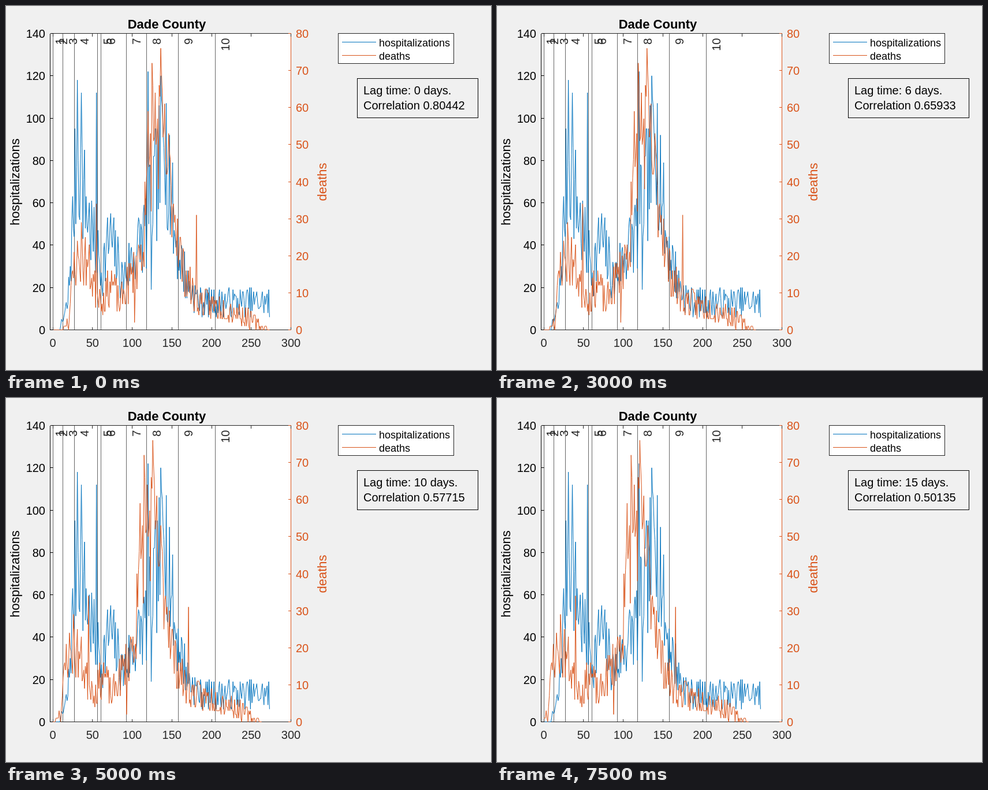
Write an HTML page that moves like this. It is 840 px wide and 630 px high and loops after 8 s.

```html
<!DOCTYPE html>
<html lang="en">
<head>
<meta charset="utf-8">
<title>Lag correlation</title>
<style>
  html, body { margin: 0; width: 100%; height: 100%; overflow: hidden; background: #f0f0f0; }
  svg { display: block; width: 840px; height: 630px; }
  text { font-family: "Liberation Sans", Arial, sans-serif; font-size: 20px; fill: #000; }
  .label { font-size: 22px; }
  .legend { font-size: 18px; }
  .crisp { shape-rendering: crispEdges; fill: none; }
  .series { fill: none; stroke-width: 1; stroke-linejoin: round; }
</style>
</head>
<body>
<svg id="stage" viewBox="0 0 840 630" xmlns="http://www.w3.org/2000/svg"></svg>
<script>
const stage = document.getElementById('stage');
const DARK = '#262626', BLUE = '#0072bd', ORANGE = '#d95319';
const DAY = 1.375, LEFT = 76.5, RIGHT = 493.5, TOP = 47.5, BOTTOM = 560.5;
const STEP = 500, LAGS = 16, LAST_DAY = 273, TICK = 5;

const dayX = day => 81 + day * DAY;
const valueY = (value, max) => BOTTOM - value / max * (BOTTOM - TOP);
const snap = x => Math.floor(x) + 0.5;

function add(parent, tag, attrs, content) {
  const el = document.createElementNS('http://www.w3.org/2000/svg', tag);
  for (const key in attrs) el.setAttribute(key, attrs[key]);
  if (content !== undefined) el.textContent = content;
  parent.append(el);
  return el;
}
const line = (x1, y1, x2, y2, stroke = DARK, opacity = 1) =>
  add(stage, 'line', { x1, y1, x2, y2, stroke, 'stroke-opacity': opacity, class: 'crisp' });
const box = (x, y, width, height, fill, stroke) =>
  add(stage, 'rect', { x, y, width, height, fill, stroke, 'shape-rendering': 'crispEdges' });
const text = (x, y, content, attrs = {}) => add(stage, 'text', { x, y, ...attrs }, content);
const upright = (x, y, content, attrs) =>
  text(0, 0, content, { transform: `translate(${x} ${y}) rotate(-90)`, ...attrs });

function seeded(seed) {
  return () => {
    seed = (seed * 1664525 + 1013904223) >>> 0;
    return seed / 4294967296;
  };
}

// Linear interpolation through [x, y] points, held flat at both ends.
function interpolate(points, x) {
  const next = points.findIndex(p => p[0] > x);
  if (next === 0) return points[0][1];
  if (next < 0) return points[points.length - 1][1];
  const [x0, y0] = points[next - 1], [x1, y1] = points[next];
  return y0 + (y1 - y0) * (x - x0) / (x1 - x0);
}

// Each series is a trend with daily noise around it and a few fixed spikes.
const hospitalizations = {
  max: 140, noise: 0.4, seed: 7,
  trend: [[9, 0], [19, 12], [31, 86], [40, 62], [52, 40], [62, 28], [72, 44], [88, 23],
    [100, 34], [118, 48], [138, 82], [146, 80], [153, 45], [170, 21], [185, 13], [273, 13]],
  spikes: { 31: 118, 36: 112, 55: 112, 120: 122, 124: 19, 136: 120, 143: 107, 273: 6 }
};
const deaths = {
  max: 80, noise: 0.3, seed: 23,
  trend: [[12, 0], [20, 3], [28, 19], [44, 18], [54, 11], [64, 8], [74, 13], [84, 7],
    [102, 16], [114, 23], [126, 53], [136, 54], [154, 32], [163, 17], [180, 8], [230, 5], [273, 0]],
  spikes: { 36: 29, 55: 34, 103: 2, 116: 40, 120: 59, 125: 72, 136: 76, 181: 31 }
};

function seriesPoints({ max, noise, seed, trend, spikes }) {
  const random = seeded(seed), points = [];
  for (let day = 1; day <= LAST_DAY; day++) {
    const mean = interpolate(trend, day);
    const spread = Math.min(mean, noise * mean + 2);
    const value = spikes[day] ?? Math.round(mean + spread * (random() * 2 - 1));
    points.push(`${dayX(day).toFixed(2)},${valueY(value, max).toFixed(2)}`);
  }
  return points.join(' ');
}

// Axes
box(LEFT, TOP, RIGHT - LEFT, BOTTOM - TOP, '#fff', 'none');
line(LEFT, TOP, RIGHT, TOP);
line(LEFT, BOTTOM, RIGHT, BOTTOM);
line(LEFT, TOP, LEFT, BOTTOM, '#000');
line(RIGHT, TOP, RIGHT, BOTTOM, ORANGE);
for (let day = 0; day <= 300; day += 50) {
  const x = snap(dayX(day));
  line(x, BOTTOM, x, BOTTOM - TICK);
  line(x, TOP, x, TOP + TICK);
  text(dayX(day), 590, day, { 'text-anchor': 'middle', style: `fill:${DARK}` });
}
for (let value = 0; value <= 140; value += 20) {
  const y = valueY(value, 140);
  line(LEFT, snap(y), LEFT + TICK, snap(y), '#000');
  text(68, y + 7.5, value, { 'text-anchor': 'end' });
}
for (let value = 0; value <= 80; value += 10) {
  const y = valueY(value, 80);
  line(RIGHT - TICK, snap(y), RIGHT, snap(y), ORANGE);
  text(502, y + 7.5, value, { style: `fill:${ORANGE}` });
}
text(278.5, 39, 'Dade County', { class: 'label', 'text-anchor': 'middle', 'font-weight': 'bold' });
upright(23, 304.5, 'hospitalizations', { class: 'label', 'text-anchor': 'middle' });
upright(555, 304.5, 'deaths', { class: 'label', 'text-anchor': 'middle', style: `fill:${ORANGE}` });

// Numbered event days; the first lies outside the plot
[-4, 0, 13, 27, 56, 61, 93, 118, 158, 205].forEach((day, i) => {
  const x = snap(dayX(day));
  if (x > LEFT) line(x, TOP, x, BOTTOM, DARK, 0.7);
  upright(x + 24.5, 55.5, i + 1, { 'text-anchor': 'end', style: `fill:${DARK}` });
});

// Data
const clip = add(add(stage, 'defs', {}), 'clipPath', { id: 'plot' });
add(clip, 'rect', { x: 81, y: TOP, width: RIGHT - 81, height: BOTTOM - TOP + 1 });
const plot = add(stage, 'g', { 'clip-path': 'url(#plot)' });
add(plot, 'polyline', { class: 'series', stroke: BLUE, points: seriesPoints(hospitalizations) });
const deathLine = add(plot, 'polyline', { class: 'series', stroke: ORANGE, points: seriesPoints(deaths) });

// Legend
box(575.5, 47.5, 200, 52, '#fff', DARK);
[['hospitalizations', BLUE], ['deaths', ORANGE]].forEach(([name, color], i) => {
  line(582, 62.5 + 23 * i, 641, 62.5 + 23 * i, color);
  text(646, 70 + 23 * i, name, { class: 'legend' });
});

// Annotation
const noteBox = box(608.5, 125.5, 209, 68, 'none', '#000');
const lagText = text(619, 153, '');
const correlationText = text(619, 179, '');
const correlationCurve = [[0, 0.80442], [3, 0.65887], [6, 0.65933], [9, 0.60699],
  [10, 0.57715], [13, 0.5098], [15, 0.50135]];

function render(time) {
  const lag = Math.floor(time / STEP) % LAGS;
  const correlation = String(Number(interpolate(correlationCurve, lag).toFixed(5)));
  deathLine.setAttribute('transform', `translate(${-lag * DAY} 0)`);
  lagText.textContent = `Lag time: ${lag} days.`;
  correlationText.textContent = `Correlation ${correlation}`;
  noteBox.setAttribute('width', 132 + 11 * correlation.length);
}

const start = performance.now();
function tick() {
  render(performance.now() - start);
  requestAnimationFrame(tick);
}
tick();
</script>
</body>
</html>
```
